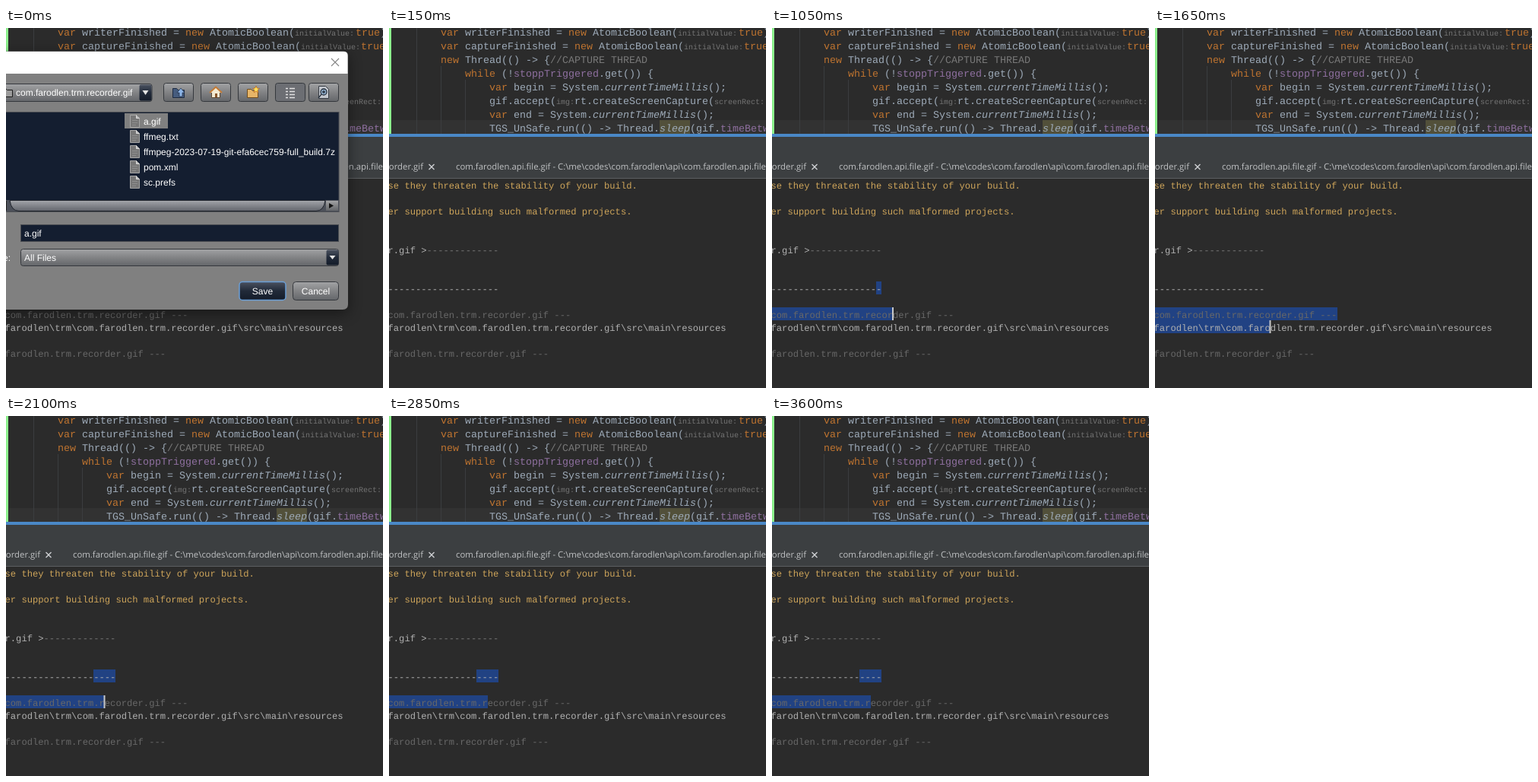
These frames come from a looping animation (496x473 px, 3.9 s). An HTML page:

```html
<!DOCTYPE html>
<html lang="en">
<head>
<meta charset="utf-8">
<title>Console selection</title>
<style>
  html, body { margin: 0; width: 100%; height: 100%; overflow: hidden; background: #2b2b2b; }
  svg { display: block; width: 496px; height: 473px; }
  text { white-space: pre; text-rendering: geometricPrecision; }

  .code { font: 13.333px "Liberation Mono", monospace; fill: #9eabb9; }
  .key { fill: #bf7430; }
  .note { fill: #787878; }
  .field { fill: #8f70a0; }
  .call { font-style: italic; }
  .hint { font-size: 10px; fill: #747474; }
  .guide { stroke: #3b3d3f; }

  .tabs { font: 11.35px "Open Sans", sans-serif; fill: #c0c2c4; }
  .console { font: 12.167px "Liberation Mono", monospace; fill: #b0b0b0; }
  .warn { fill: #cda45a; }
  .dim { fill: #686868; }
  .select { fill: #214283; }
  .caret { fill: #c8c8c8; }

  .dialog { font: 12px "Liberation Sans", Arial, sans-serif; fill: #fff; filter: drop-shadow(0 5px 9px rgba(0, 0, 0, .45)); }
  .button { fill: url(#metal); stroke: #35383d; }
  .sunken { fill: #141e30; stroke: #4a4d52; }

  /* Loop of 3900 ms; every change is a hard cut. */
  .step { opacity: 0; animation: 3900ms step-end infinite; }
  .open { animation-name: open; }
  .first { animation-name: first; }
  .second { animation-name: second; }
  .third { animation-name: third; }
  .blink { animation-name: blink; }
  @keyframes open { 0% { opacity: 1 } 3.8462%, 100% { opacity: 0 } }
  @keyframes first { 0% { opacity: 0 } 26.9231% { opacity: 1 } 42.3077%, 100% { opacity: 0 } }
  @keyframes second { 0% { opacity: 0 } 42.3077% { opacity: 1 } 53.8462%, 100% { opacity: 0 } }
  @keyframes third { 0% { opacity: 0 } 53.8462%, 100% { opacity: 1 } }
  @keyframes blink {
    0% { opacity: 0 }
    53.8462% { opacity: 1 }
    65.3846% { opacity: 0 }
    80.7692% { opacity: 1 }
    92.3077%, 100% { opacity: 0 }
  }
</style>
</head>
<body>
<svg viewBox="0 0 496 473" xmlns="http://www.w3.org/2000/svg">
  <defs>
    <linearGradient id="metal" x2="0" y2="1">
      <stop offset="0" stop-color="#a2a3a5"/>
      <stop offset=".5" stop-color="#828385"/>
      <stop offset="1" stop-color="#64666a"/>
    </linearGradient>
    <linearGradient id="night" x2="0" y2="1">
      <stop offset="0" stop-color="#4b5260"/>
      <stop offset=".5" stop-color="#212a39"/>
      <stop offset="1" stop-color="#141c2a"/>
    </linearGradient>
    <linearGradient id="thumb" x2="0" y2="1">
      <stop offset="0" stop-color="#a4a6ab"/>
      <stop offset="1" stop-color="#62656c"/>
    </linearGradient>
    <g id="page">
      <path d="M.5 .5h8l4 4v12h-12z" fill="#777" stroke="#a5a5a5"/>
      <path d="M8.5 .5v4h4" fill="#bbb" stroke="#ddd"/>
      <path d="M3 7.5h7M3 10.5h7M3 13.5h5" stroke="#8e8e8e"/>
    </g>
    <path id="folder" d="M.5 2.5h5l2 2h7v9h-14z"/>
  </defs>

  <rect width="496" height="473" fill="#2b2b2b"/>

  <!-- Editor -->
  <rect x="4" y="121" width="492" height="18" fill="#323232"/>
  <path class="guide" d="M36.5 0V139M68.5 50V139M100.5 68V139"/>
  <rect width="3" height="139" fill="#8cf08c"/>
  <rect x="356" y="121" width="40" height="18" fill="#52503a"/>
  <g class="code">
    <text x="68" y="10"><tspan class="key">var</tspan> writerFinished = <tspan class="key">new</tspan> AtomicBoolean(<tspan class="hint">initialValue:</tspan><tspan class="key" x="460">true</tspan>)</text>
    <text x="68" y="28"><tspan class="key">var</tspan> captureFinished = <tspan class="key">new</tspan> AtomicBoolean(<tspan class="hint">initialValue:</tspan><tspan class="key" x="467">true</tspan>)</text>
    <text x="68" y="46"><tspan class="key">new</tspan> Thread(() -&gt; {<tspan class="note">//CAPTURE THREAD</tspan></text>
    <text x="100" y="64"><tspan class="key">while</tspan> (!<tspan class="field">stoppTriggered</tspan>.get()) {</text>
    <text x="132" y="82"><tspan class="key">var</tspan> begin = System.<tspan class="call">currentTimeMillis</tspan>();</text>
    <text x="132" y="100">gif.accept(<tspan class="hint">img:</tspan>rt.createScreenCapture(<tspan class="hint">screenRect:</tspan></text>
    <text x="132" y="118"><tspan class="key">var</tspan> end = System.<tspan class="call">currentTimeMillis</tspan>();</text>
    <text x="132" y="136">TGS_UnSafe.run(() -&gt; Thread.<tspan class="call">sleep</tspan>(gif.<tspan class="field">timeBetw</tspan></text>
  </g>

  <!-- Tabs -->
  <rect y="139" width="496" height="58" fill="#3c3f41"/>
  <rect y="139" width="496" height="4" fill="#4a88c7"/>
  <rect y="197" width="496" height="1" fill="#5c5f61"/>
  <g class="tabs">
    <text x="45" y="186" text-anchor="end">recorder.gif</text>
    <path d="M52.5 179l7 7m0-7l-7 7" stroke="#d0d2d4" stroke-width="1.4"/>
    <text x="88" y="186">com.farodlen.api.file.gif - C:\me\codes\com.farodlen\api\com.farodlen.api.file</text>
  </g>

  <!-- Selections -->
  <g class="select">
    <g class="step first">
      <path d="M137 333h7v17h-7zM0 367h159v17H0z"/>
      <rect class="caret" x="158" y="367" width="2" height="17"/>
    </g>
    <g class="step second">
      <path d="M0 367h240v17H0zM0 384h151v17H0z"/>
      <rect class="caret" x="150.5" y="384" width="2" height="17"/>
    </g>
    <path class="step third" d="M115 333h29v17h-29zM0 367h130v17H0z"/>
  </g>

  <!-- Console -->
  <g class="console">
    <text class="warn" x="-1.5" y="211">se they threaten the stability of your build.</text>
    <text class="warn" x="-1.5" y="245">er support building such malformed projects.</text>
    <text x="-1.5" y="296">r.gif &gt;<tspan class="note">-------------</tspan></text>
    <text x="-1.5" y="346.5">--------------------</text>
    <text class="dim" x="-1.5" y="380.5">com.farodlen.trm.recorder.gif ---</text>
    <text x="-1.5" y="398">farodlen\trm\com.farodlen.trm.recorder.gif\src\main\resources</text>
    <text class="dim" x="-1.5" y="432">farodlen.trm.recorder.gif ---</text>
  </g>
  <rect class="caret step blink" x="128.5" y="367" width="2" height="17"/>

  <!-- Save dialog -->
  <g class="step open">
    <g class="dialog">
      <path d="M-20 30.5H444q6 0 6 6V363q0 7-7 7H-20z" fill="#808080"/>
      <path d="M-20 31H444q5.500 0 5.500 5V60H-20z" fill="#fff"/>
      <path d="M428 40l10 10m0-10l-10 10" stroke="#858585" stroke-width="1.1"/>

      <rect class="button" x="-10" y="73.5" width="202" height="23" rx="3"/>
      <use href="#folder" x="-6" y="77" fill="#9c9c9c" stroke="#1c1c1c"/>
      <text x="13" y="89">com.farodlen.trm.recorder.gif</text>
      <rect x="175.5" y="74.5" width="16" height="21" rx="2" fill="url(#night)"/>
      <path d="M179.5 82h8l-4 6z" fill="#e4e4e4"/>

      <g class="button">
        <rect x="207.5" y="72.5" width="39" height="24" rx="3"/>
        <rect x="256.5" y="72.5" width="39" height="24" rx="3"/>
        <rect x="305.5" y="72.5" width="39" height="24" rx="3"/>
        <rect x="354.5" y="72.5" width="39" height="24" rx="3" fill="#6c6e73"/>
        <rect x="398.5" y="72.5" width="39" height="24" rx="3"/>
      </g>
      <path d="M219.5 79.5h5l2 2h8v10h-15z" fill="#465c7e" stroke="#1d2a40"/>
      <path d="M228 90v-5h-3l5-6 5 6h-3v5z" fill="#8cb4e6" stroke="#1d2a40" stroke-width=".7"/>
      <path d="M270.5 84v7.5h11V84" fill="#f3ead2" stroke="#5c4630"/>
      <path d="M268 85l8-7.5 8 7.5" fill="#f3ead2" stroke="#c47a34" stroke-width="2"/>
      <path d="M275 91v-5h3v5z" fill="#8a562b"/>
      <use href="#folder" x="317" y="78" fill="#e6b568" stroke="#704c1c"/>
      <path d="M329 76l1.3 3 3.2.5-2.4 2 .7 3.3-2.8-1.8-2.8 1.8.7-3.3-2.4-2 3.2-.5z" fill="#ffe25c" stroke="#b85f16" stroke-width=".7"/>
      <path d="M368 79.5h3m2 0h7M368 83.5h3m2 0h7M368 87.5h3m2 0h7M368 91.5h3m2 0h7" stroke="#e2e2e2" stroke-width="1.4"/>
      <path d="M411.5 76.5h9l4 4v12h-13z" fill="#c4c8ce" stroke="#363b43"/>
      <circle cx="418" cy="84" r="4" fill="#8eacc9" stroke="#28323f" stroke-width="1.3"/>
      <path d="M415 87l-4 5M416 84h4M418 82v4" stroke="#28323f" stroke-width="1.3"/>

      <rect class="sunken" x="-5" y="110.5" width="443" height="131"/>
      <rect x="156" y="112" width="57" height="20" fill="#808080"/>
      <use href="#page" x="163" y="114"/>
      <use href="#page" x="163" y="134"/>
      <use href="#page" x="163" y="154"/>
      <use href="#page" x="163" y="174"/>
      <use href="#page" x="163" y="194"/>
      <text x="181" y="127">a.gif</text>
      <text x="181" y="147">ffmeg.txt</text>
      <text x="181" y="167">ffmpeg-2023-07-19-git-efa6cec759-full_build.7z</text>
      <text x="181" y="187">pom.xml</text>
      <text x="181" y="207">sc.prefs</text>

      <rect y="226" width="438" height="15" fill="#4c5059"/>
      <path d="M5 226.5H420q-2 14-12 14H17q-10 0-12-14z" fill="url(#thumb)" stroke="#1e222a"/>
      <rect x="421" y="227" width="16" height="13" fill="url(#metal)"/>
      <path d="M425 230l6 3.5-6 3.5z" fill="#111"/>
      <path d="M0 227v13" stroke="#222" stroke-width="2"/>

      <rect class="sunken" x="19.5" y="258.5" width="418" height="22"/>
      <text x="24" y="274">a.gif</text>
      <text x="6" y="306" text-anchor="end">Files of Type:</text>
      <rect class="button" x="19.5" y="290.5" width="418" height="22" rx="3"/>
      <text x="24" y="306">All Files</text>
      <rect x="421.5" y="291.5" width="16" height="20" rx="2" fill="url(#night)"/>
      <path d="M425.5 299h8l-4 5z" fill="#e4e4e4"/>

      <rect x="307" y="333.5" width="61" height="24" rx="4" fill="url(#night)" stroke="#6b9fd6" stroke-width="1.5"/>
      <text x="337.5" y="350" text-anchor="middle">Save</text>
      <rect class="button" x="377.5" y="333.5" width="60" height="24" rx="4"/>
      <text x="407.5" y="350" text-anchor="middle">Cancel</text>
    </g>
  </g>
</svg>
</body>
</html>
```
